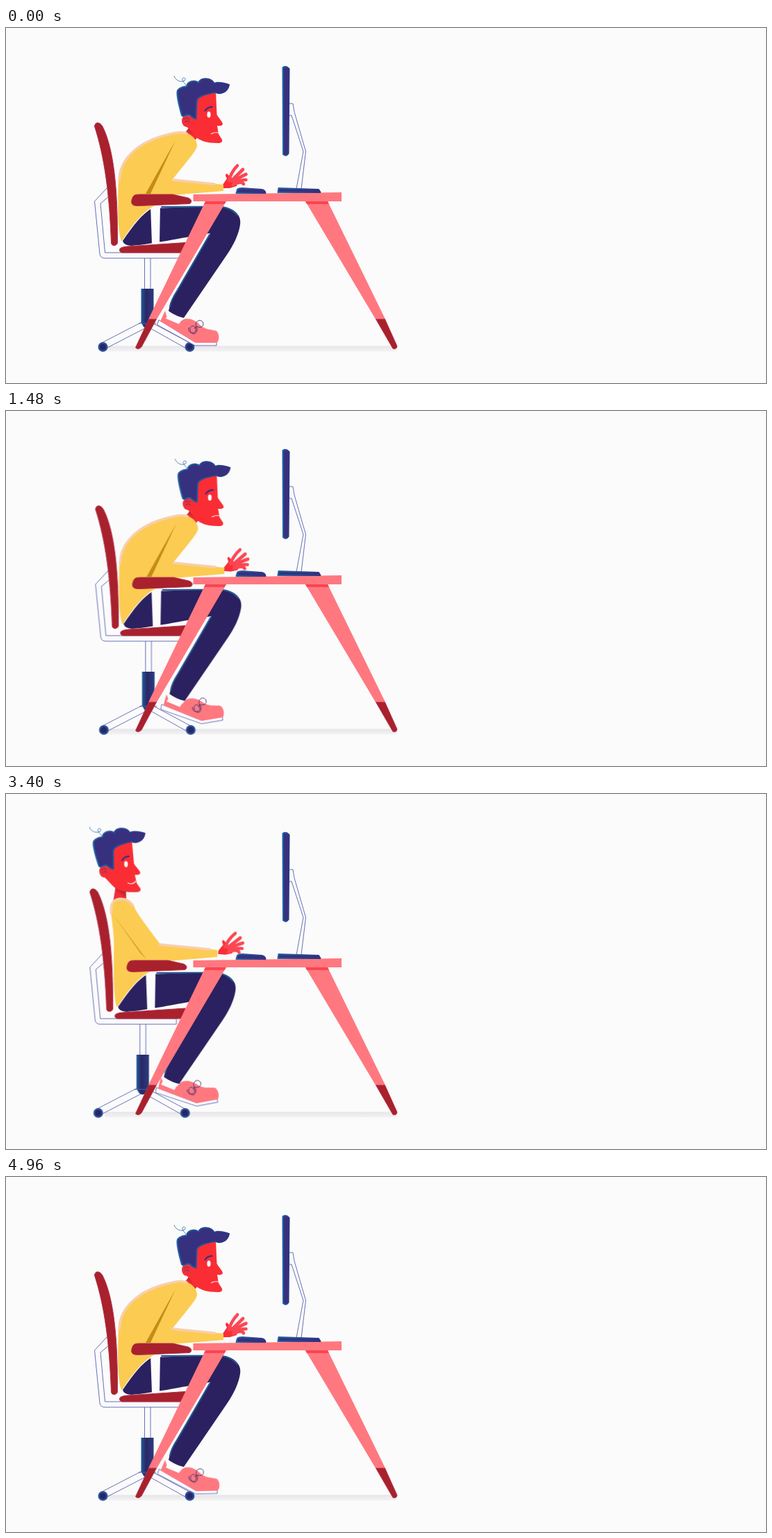
An HTML page without scripts for the animation above (5 s loop, 1094 by 512 pixels).

```html
<!DOCTYPE html>
<html lang="en">
<head>
<meta charset="utf-8">
<title>Posture at the desk</title>
<style>
html, body { margin: 0; width: 100%; height: 100%; overflow: hidden; background: #fbfbfb; }
svg { display: block; width: 100%; height: 100%; }

.navy { fill: #2b2160; }
.blue { fill: #36307e; }
.rim { stroke: url(#rim); stroke-width: 2; stroke-linejoin: round; }
.glow { fill: none; stroke: #235a94; stroke-width: 2; stroke-linecap: round; }
.dark { fill: #a8212c; stroke: #b2324a; stroke-width: 1; }
.pink { fill: #ff7880; }
.line { fill: none; stroke: #5660ad; stroke-width: .9; stroke-linejoin: round; }
.white { fill: #fcfcfd; }
.skin { fill: #fa2d35; }

.chair, .head, .tilt, .foot, .hand, .fingers, .body, .back, .fold, .neck, .mouth {
  animation: 5s ease-in-out infinite;
}
.chair { animation-name: roll; }
.head { animation-name: sit; }
.tilt { animation-name: nod; transform-origin: 278px 157px; }
.foot { animation-name: tap; transform-origin: 234px 405px; }
.hand { animation-name: type; transform-origin: 314px 230px; }
.fingers { animation: drum .5s ease-in-out infinite; transform-origin: 322px 224px; }
.body { animation-name: body; }
.back { animation-name: back; }
.fold { animation-name: fold; }
.neck { animation-name: neck; }
.mouth { animation-name: mouth; }

@keyframes roll {
  0%, 36%, 40%, 96%, to { transform: translateX(0); }
  7.2% { transform: translateX(1px); }
  20% { transform: translateX(4px); }
  46.4% { transform: translateX(-4px); }
  52%, 85% { transform: translateX(-6.7px); }
  92% { transform: translateX(2px); }
}
@keyframes sit {
  0%, 45.5%, 95.5%, to { transform: translate(0, 0); animation-timing-function: ease-in; }
  48.75%, 91% { transform: translate(-55px, -18px); animation-timing-function: ease-out; }
  52%, 86.5% { transform: translate(-111px, -23.5px); animation-timing-function: ease-in; }
}
@keyframes nod {
  0%, 18%, 45%, 70%, to { transform: translateY(0) rotate(0); }
  6.8%, 12% { transform: translateY(0) rotate(15deg); }
  55%, 64% { transform: translateY(1.5px) rotate(-12deg); }
}
@keyframes tap {
  0%, 40%, 80%, to { transform: rotate(0); animation-timing-function: cubic-bezier(.39, .575, .565, 1); }
  20%, 60%, 90% { transform: rotate(-13deg); animation-timing-function: cubic-bezier(.47, 0, .745, .715); }
}
@keyframes type {
  0%, 7.2%, 20%, 56%, to { transform: rotate(0); }
  4%, 12%, 28%, 48%, 68%, 92% { transform: rotate(6deg); }
  40% { transform: rotate(9deg); }
  16%, 34%, 62% { transform: rotate(-3deg); }
  80% { transform: rotate(-7deg); }
}
@keyframes drum {
  0%, to { transform: rotate(0); }
  50% { transform: rotate(4deg); }
}
@keyframes body {
  0%, 45.5%, 95.5%, to { d: path("M166,307C160,290 161,250 162,215C164,185 195,160 245,150C262,148 275,158 275,170C275,175 266,186 240,218L313,226L313,235L240,241L209,259C195,268 182,284 167,307Z"); }
  52%, 86.5% { d: path("M166,307C161,290 162,250 162,215C162,200 159,182 157,166C157,145 185,145 192,164C193,168 201,180 229,217L311,225L311,235L240,241L209,259C195,268 182,284 167,307Z"); }
}
@keyframes back {
  0%, 45.5%, 95.5%, to { d: path("M163,220C164,185 195,160 245,151C251,150 256,150 260,152M240,219L300,225"); }
  52%, 86.5% { d: path("M158,172C158,168 158,166 158,165C158,148 180,147 189,160M228,217L300,224"); }
}
@keyframes fold {
  0%, 45.5%, 95.5%, to { d: path("M244,162L201,239L208,239Z"); }
  52%, 86.5% { d: path("M161,174L200,229L209,239Z"); }
}
@keyframes neck {
  0%, 45.5%, 95.5%, to { d: path("M268,138L257,152L272,162L282,150Z"); }
  52%, 86.5% { d: path("M166,124L161,155L180,155L179,130Z"); }
}
@keyframes mouth {
  0%, 45.5%, 95.5%, to { d: path("M295,153Q299,150 306,151"); }
  52%, 86.5% { d: path("M293,152Q300,156 305,150"); }
}
</style>
</head>
<body>
<svg viewBox="0 0 1094 512" preserveAspectRatio="none">
  <defs>
    <linearGradient id="rim">
      <stop stop-color="#1f67a6"/>
      <stop offset="1" stop-color="#2f3380"/>
    </linearGradient>
    <linearGradient id="tube">
      <stop stop-color="#1d5b98"/>
      <stop offset=".4" stop-color="#2b2766"/>
      <stop offset="1" stop-color="#2a3c80"/>
    </linearGradient>
    <linearGradient id="shade" x1="1" x2=".6" y2="1">
      <stop offset=".5" stop-color="#a8202c"/>
      <stop offset=".75" stop-color="#f22c36"/>
    </linearGradient>
    <linearGradient id="ground" x2="0" y2="1">
      <stop stop-color="#e7e5e7"/>
      <stop offset="1" stop-color="#f3f2f4"/>
    </linearGradient>
    <g id="wheel">
      <circle r="7" fill="#27559a"/>
      <circle r="4.6" fill="#2b2566"/>
    </g>
  </defs>

  <rect x="142" y="458.500" width="421" height="8" rx="4" fill="url(#ground)"/>

  <g class="chair">
    <!-- chair -->
    <path class="line" d="M145,231L127.500,250L135,326Q136,332 142,332H252V324H142.500L136,253L148,243"/>
    <path class="line" d="M199.500,332V376M208,332V376"/>
    <path class="line" d="M198,423L190,427L136,455L144,462L204,431L261,463L268,456L210,425"/>
    <path fill="url(#tube)" d="M194.500,376H212.500V425L209,431Q203,436 198,431L194.500,425Z"/>
    <path class="line" d="M191,426H216"/>
    <use href="#wheel" x="139.500" y="460"/>
    <use href="#wheel" x="264.500" y="460"/>
    <path class="dark" d="M127.500,142C128,135 135,135 139,142C153,170 161,220 160.500,310C159,315 152,315 151.500,310C149,240 142,187 127.500,142Z"/>
    <path class="dark" d="M163.500,320Q163,316 175,315L265,309L272,324H168Q163.500,324 163.500,320Z"/>

    <!-- shoe -->
    <g class="foot">
      <path class="line white" d="M220,421L217.500,428L272,458H303V453L272,453Z"/>
      <path class="pink" d="M229,408L232,418L250,425C256,416 269,418 279,428C285,435 297,435 303,437C308,442 307,452 303,454H273L222,423Z"/>
      <path class="line" style="stroke:#3a2d6e" d="M263,432C261,439 270,443 273,437C275,430 267,427 265,433C264,441 273,445 275,436C276,429 271,431 272,434M274,432C270,422 282,418 284,426C284,432 278,433 274,430"/>
    </g>
    <path class="white" d="M236,407L255,417L249,427L230,419Z"/>

    <!-- trousers -->
    <path class="navy" d="M168,307C183,285 196,268 210,260L300,257C325,256 340,268 337,284C335,298 327,314 318,327L256,418C250,417 240,413 234,408C236,398 240,388 246,378L294,296C250,303 210,312 180,314Q169,313 168,307Z"/>
    <path class="glow" d="M224,258L300,257.500C316,257 327,262 333,270M236,402C237,395 241,387 247,378L293,298"/>
    <path class="white" d="M208,255H222L221,311H210Z"/>

    <!-- hand -->
    <g class="hand">
      <path class="skin" d="M312,226L318,217Q314,211 318,210L324,216L334,220L332,228L322,231L312,231Z"/>
      <g class="fingers" fill="none" stroke="#fb4653" stroke-width="4.600" stroke-linecap="round">
        <path d="M321,220Q324,208 333,198.500M325,220Q333,212 341,204M328,221Q338,214 345.500,211M328,224Q338,219 345.500,219M327,226Q339,220 342,225"/>
      </g>
    </g>

    <!-- neck, head -->
    <path class="neck" fill="url(#shade)" d="M268,138L257,152L272,162L282,150Z"/>
    <g class="head"><g class="tilt">
      <path class="skin" d="M272,100L302,91L303.500,125C306,130 312,135 312,139C310,142 306,141 304,141L306,153L311,161C312,165 309,166 305,166C290,166 279,163 272,156L260,142L266,122Z"/>
      <ellipse cx="260.500" cy="134" rx="7.500" ry="8.800" fill="#ee303b"/>
      <path class="line" style="stroke:#8b2450" d="M256,132Q260,128 264,132M257,136Q261,132 264,136"/>
      <path class="blue rim" d="M246.500,92C247,87 253,85 260,84C261,77 272,74 277,79C281,71 295,71 300,80C305,77 317,80 321,82C319,92 309,97 301,92.500C292,95 276,97 274.500,105L273.500,131C268,131 267,126 263,125C257,125 256,130 253,126C249,112 246,100 246.500,92Z"/>
      <path class="line" style="stroke:#3f78b8" d="M242,69C244,76 252,79 257,76C260,73 256,70 254,73C253,77 258,80 260,84"/>
      <ellipse cx="292" cy="125" rx="2.600" ry="4.400" fill="#fff"/>
      <path d="M286,120Q290,113.500 297.500,114" fill="none" stroke="#36307e" stroke-width="2.200"/>
      <path class="mouth" d="M295,153Q299,150 306,151" fill="none" stroke="#ffe3e3" stroke-width="1.200"/>
    </g></g>

    <!-- shirt -->
    <path class="body" fill="#fccb52" d="M166,307C160,290 161,250 162,215C164,185 195,160 245,150C262,148 275,158 275,170C275,175 266,186 240,218L313,226L313,235L240,241L209,259C195,268 182,284 167,307Z"/>
    <path class="back" fill="none" stroke="#f8cfae" stroke-width="3.500" stroke-linecap="round" d="M163,220C164,185 195,160 245,151C251,150 256,150 260,152M240,219L300,225"/>
    <path class="fold" fill="#c48c16" d="M244,162L201,239L208,239Z"/>
    <path class="dark" d="M181,248C183,240 186,240 195,240H240L262,245C268,247 268,252 264,253.500L190,256.500C181,256.500 180,253 181,248Z"/>
  </g>

  <!-- desk -->
  <path class="pink" d="M287,250H317L217,420H205ZM431,250H463L546,420H532Z"/>
  <path fill="#fb4450" d="M287,250H317L314.500,254H285ZM431,250H463L465,254H433Z"/>
  <path class="dark" d="M205.500,420H216.500L195,460Q190,465 186.500,461ZM532.500,420H545.500L563,459Q562,464 557,462.500Z"/>
  <path class="pink" d="M269.500,240L483,237V250H269.500Z"/>

  <!-- screen, keyboard -->
  <path class="line" d="M407,109H413L415,121L431.500,178L425,232M407,126H411L428,178L418,232"/>
  <path class="blue rim" d="M398.500,57Q403,54 407.500,59L406.500,181Q403,186 399,182Z"/>
  <path class="blue rim" d="M391.500,237L392.500,231L450,233L452.500,237Z"/>
  <path class="blue rim" d="M331.500,238L333,233Q335,231 340,231L368,233Q373,234 373.500,238Z"/>
</svg>
</body>
</html>
```
